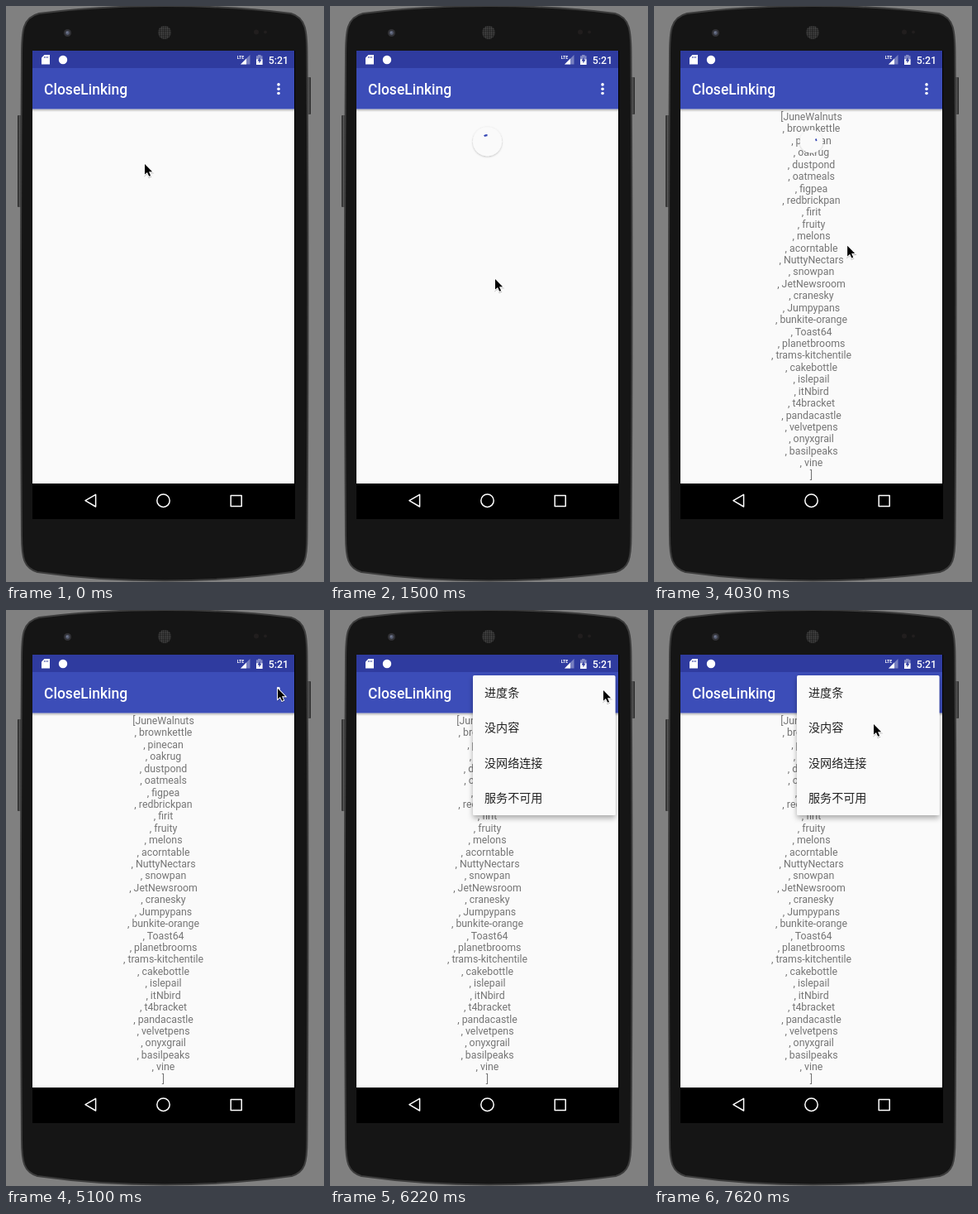
Animation of 385x696 px, one loop 8000 ms. Source, as an HTML page:

```html
<!DOCTYPE html>
<html lang="en">
<head>
<meta charset="utf-8">
<title>Refresh list</title>
<style>
  html, body { margin: 0; height: 100%; overflow: hidden; background: #808080; }
  svg { display: block; width: 100vw; height: 100vh; font-family: Roboto, sans-serif; }
  #list { font-size: 12.33px; fill: #757575; text-anchor: middle; }
  #menu { font: 14.1px "Noto Sans CJK SC", "Noto Sans CJK", sans-serif; fill: #212121; }
  .medium { font-weight: 500; fill: #fff; }
</style>
</head>
<body>
<svg viewBox="0 0 385 696" preserveAspectRatio="none">
  <defs>
    <linearGradient id="barShade" x2="0" y2="1">
      <stop stop-opacity=".28"/><stop offset="1" stop-opacity="0"/>
    </linearGradient>
    <linearGradient id="key">
      <stop stop-color="#222"/><stop offset=".5" stop-color="#555"/><stop offset="1" stop-color="#222"/>
    </linearGradient>
    <pattern id="mesh" width="2.4" height="2.4" patternUnits="userSpaceOnUse">
      <rect width="2.4" height="2.4" fill="#1c1c1c"/><circle cx="1.2" cy="1.2" r=".8" fill="#5c5c5c"/>
    </pattern>
    <filter id="discShadow" x="-30%" y="-30%" width="160%" height="160%">
      <feDropShadow dx="0" dy=".8" stdDeviation="1.1" flood-opacity=".26"/>
    </filter>
    <filter id="menuShadow" x="-10%" y="-10%" width="120%" height="120%">
      <feDropShadow dx="0" dy="3.5" stdDeviation="3.2" flood-opacity=".32"/>
    </filter>
    <filter id="cursorShadow" x="-50%" y="-50%" width="200%" height="200%">
      <feDropShadow dx="0" dy=".8" stdDeviation=".7" flood-opacity=".4"/>
    </filter>
    <clipPath id="content"><rect x="32" y="124" width="317" height="453"/></clipPath>
    <clipPath id="reveal"><rect id="revealBox" x="165" y="70" width="190" height="190"/></clipPath>
  </defs>

  <!-- phone -->
  <rect width="385" height="696" fill="#808080"/>
  <rect x="14" y="132" width="5" height="111" rx="1" fill="url(#key)"/>
  <rect x="364" y="86" width="5" height="45" rx="1" fill="url(#key)"/>
  <path d="M19 60C19 30 20 14 40 9Q110 0 192 0Q275 0 345 9C363 14 364.500 30 364.500 60Q366.500 350 364.500 640C364.500 668 362 679 346 684Q270 694.500 192 694.500Q112 694.500 38 684C22 679 19 668 19 640Q17 350 19 60Z"
    fill="#151515" stroke="#3c3c3c" stroke-width="2"/>
  <circle cx="74.500" cy="32.500" r="4.500" fill="#323236"/>
  <circle cx="74.500" cy="32.500" r="2.400" fill="#555c70"/>
  <circle cx="74" cy="32" r=".8" fill="#8f97ab"/>
  <circle cx="192" cy="32" r="8" fill="url(#mesh)"/>
  <circle cx="303" cy="31.500" r="3" fill="#211e1e"/>
  <circle cx="314" cy="31.500" r="2" fill="#211e1e"/>

  <!-- screen -->
  <rect x="32" y="54" width="318" height="566"/>
  <rect x="32" y="124" width="317" height="453" fill="#fafafa"/>
  <g clip-path="url(#content)">
    <g id="list"></g>
    <g id="disc">
      <circle r="17.600" fill="#fafafa" filter="url(#discShadow)"/>
      <path id="arc" fill="none" stroke="#3446b4" stroke-width="2.200"/>
      <path id="head" d="M-3.800 0H3.800L0 4.400Z" fill="#3446b4"/>
    </g>
  </g>
  <rect x="32" y="124.500" width="317" height="3.500" fill="url(#barShade)"/>
  <rect x="32" y="54" width="317" height="21.500" fill="#2f3b9f"/>
  <rect x="32" y="75" width="317" height="49.500" fill="#3c4db8"/>
  <text class="medium" x="46" y="106.500" font-size="17.500">CloseLinking</text>
  <g fill="#fff">
    <circle cx="330" cy="94.900" r="1.800"/><circle cx="330" cy="100.200" r="1.800"/><circle cx="330" cy="105.500" r="1.800"/>
    <path d="M46.500 59H53V70.500H43V62.500Z"/>
    <path d="M46.500 61v2m2-2v2m2-2v2" stroke="#2f3b9f" stroke-width=".8"/>
    <circle cx="69" cy="65" r="5.200"/>
    <path d="M284 70.500H295.500V59Z" opacity=".35"/>
    <path d="M284 70.500H291V63.500Z"/>
    <text x="279.800" y="63.600" font-size="5.200" font-weight="700">LTE</text>
    <path d="M303 60.300H305V59H308.500V60.300H310.500V71H303Z" opacity=".4"/>
    <path d="M303 64.300H310.500V71H303Z"/>
    <path d="M307.500 61.500L304.500 66.500H306.500V69.500L309.300 64.800H307.500Z" fill="#2f3b9f"/>
  </g>
  <text class="medium" x="317.700" y="69.500" font-size="12.300">5:21</text>
  <g fill="none" stroke="#fff" stroke-width="1.500" stroke-linejoin="round">
    <path d="M96 597.700L108.600 590.400V605Z"/>
    <circle cx="190.500" cy="597.700" r="7.700"/>
    <path d="M272.200 591.400H285.200V604.400H272.200Z"/>
  </g>

  <g id="menu" clip-path="url(#reveal)">
    <rect x="173" y="79" width="172.500" height="169" rx="1.800" fill="#fafafa" filter="url(#menuShadow)"/>
    <text x="187" y="105">进度条</text>
    <text x="187" y="147.450">没内容</text>
    <text x="187" y="189.900">没网络连接</text>
    <text x="187" y="232.350">服务不可用</text>
  </g>
  <g id="cursor" filter="url(#cursorShadow)">
    <path d="M0 0V12.600L3 10L5.200 14.800L7.100 14L5 9.300H9.100Z" stroke="#fff" stroke-width="1.800" paint-order="stroke"/>
  </g>
</svg>

<script>
const $ = id => document.getElementById(id);
const LOOP = 8000, DP = 0.8806, RING = 7.7;
const RELEASE = 620, CYCLE_START = 1815, CYCLE = 1180, LOADED = 4000, MENU = 5640;

const names = `JuneWalnuts brownkettle pinecan oakrug dustpond oatmeals figpea redbrickpan firit fruity
  melons acorntable NuttyNectars snowpan JetNewsroom cranesky Jumpypans bunkite-orange Toast64
  planetbrooms trams-kitchentile cakebottle islepail itNbird t4bracket pandacastle velvetpens
  onyxgrail basilpeaks vine`.split(/\s+/);
const lines = [...names.map((n, i) => (i ? ", " : "[") + n), "]"];
$("list").innerHTML = lines.map((s, i) =>
  `<text x="190.5" y="${138 + i * 14.42}">${s}</text>`).join("");

// cursor stops: time, x, y
const stops = [
  [0, 168, 191], [60, 168, 191], [600, 175, 340], [870, 175, 340], [1500, 200, 330],
  [2580, 200, 330], [3080, 212, 315], [3360, 217, 311], [4030, 234, 290], [4230, 261, 247],
  [4400, 264, 240], [4600, 264, 240], [5080, 329, 95], [6050, 329, 95], [6220, 331, 97],
  [6800, 291, 121], [7150, 272, 129], [7300, 272, 129], [7620, 266, 138], [LOOP, 266, 138]
];

const ramp = (t, a, b) => Math.min(1, Math.max(0, (t - a) / (b - a)));

function cursorAt(t) {
  const i = stops.findIndex(s => s[0] > t);
  const [t0, x0, y0] = stops[i - 1], [t1, x1, y1] = stops[i];
  const k = ramp(t, t0, t1);
  return [x0 + (x1 - x0) * k, y0 + (y1 - y0) * k];
}

// cubic-bezier(.4, 0, .2, 1)
function ease(x) {
  let a = 0, b = 1;
  for (let i = 0; i < 20; i++) {
    const u = (a + b) / 2, v = 1 - u;
    if (1.2 * v * v * u + 0.6 * v * u * u + u * u * u < x) a = u; else b = u;
  }
  return a * a * (3 - 2 * a);
}

// drag distance in dp to disc position and arrow progress
function pull(y) {
  const d = Math.max(0, (y - 198) / DP / 2);
  const part = Math.min(1, d / 64);
  const tension = Math.max(0, d - 64) / 256;
  return {
    top: -40 + 64 * part + 128 * (tension - tension * tension),
    sweep: 288 * Math.max(0, part - 0.4) / 0.6,
    alpha: part < 1 ? 0.3 : 1
  };
}

// leading angle and sweep of the ring, in degrees
function ring(t) {
  if (t < CYCLE_START) {
    const left = 1 - ramp(t, 850, CYCLE_START);
    return [316 - (CYCLE_START - t) * 0.146, 288 * left * left];
  }
  const p = (t - CYCLE_START) / CYCLE, n = Math.floor(p), f = p - n;
  const lead = n + ease(Math.min(1, f * 2));
  const tail = n + ease(Math.max(0, f * 2 - 1));
  return [-44 + 306 * p + 272 * lead, 272 * (lead - tail)];
}

function drawDisc(t, y) {
  const shown = t > 60 && t < LOADED + 150;
  $("disc").style.display = shown ? "" : "none";
  if (!shown) return;

  const drag = pull(t < RELEASE ? y : 340);
  const back = 1 - (1 - ramp(t, RELEASE, RELEASE + 200)) ** 2;
  const top = drag.top + (24 - drag.top) * back;
  const scale = 1 - ramp(t, LOADED, LOADED + 150);
  $("disc").setAttribute("transform", `translate(190.5 ${125 + (top + 20) * DP}) scale(${scale})`);

  let [lead, sweep] = ring(t);
  if (t < RELEASE) sweep = drag.sweep;
  sweep = Math.max(26, sweep);
  const at = deg => {
    const r = deg * Math.PI / 180;
    return `${RING * Math.cos(r)} ${RING * Math.sin(r)}`;
  };
  $("arc").setAttribute("d", `M${at(lead - sweep)}A${RING} ${RING} 0 ${+(sweep > 180)} 1 ${at(lead)}`);
  $("arc").style.opacity = drag.alpha;
  $("head").style.opacity = t < RELEASE + 200 ? drag.alpha : 0;
  $("head").setAttribute("transform",
    `rotate(${lead}) translate(${RING} 0) scale(${Math.min(1, sweep / 288)})`);
}

function drawMenu(t) {
  const k = ramp(t, MENU, MENU + 170);
  const w = 195 * (0.3 + 0.7 * k);
  $("menu").style.opacity = k;
  $("revealBox").setAttribute("x", 355 - w);
  $("revealBox").setAttribute("width", w);
  $("revealBox").setAttribute("height", w);
}

function draw(now) {
  const t = now % LOOP;
  const [x, y] = cursorAt(t);
  $("cursor").setAttribute("transform", `translate(${x} ${y})`);
  $("list").style.display = t < LOADED ? "none" : "";
  drawDisc(t, y);
  drawMenu(t);
}

const start = performance.now();
function tick() {
  draw(performance.now() - start);
  requestAnimationFrame(tick);
}
tick();
</script>
</body>
</html>
```
